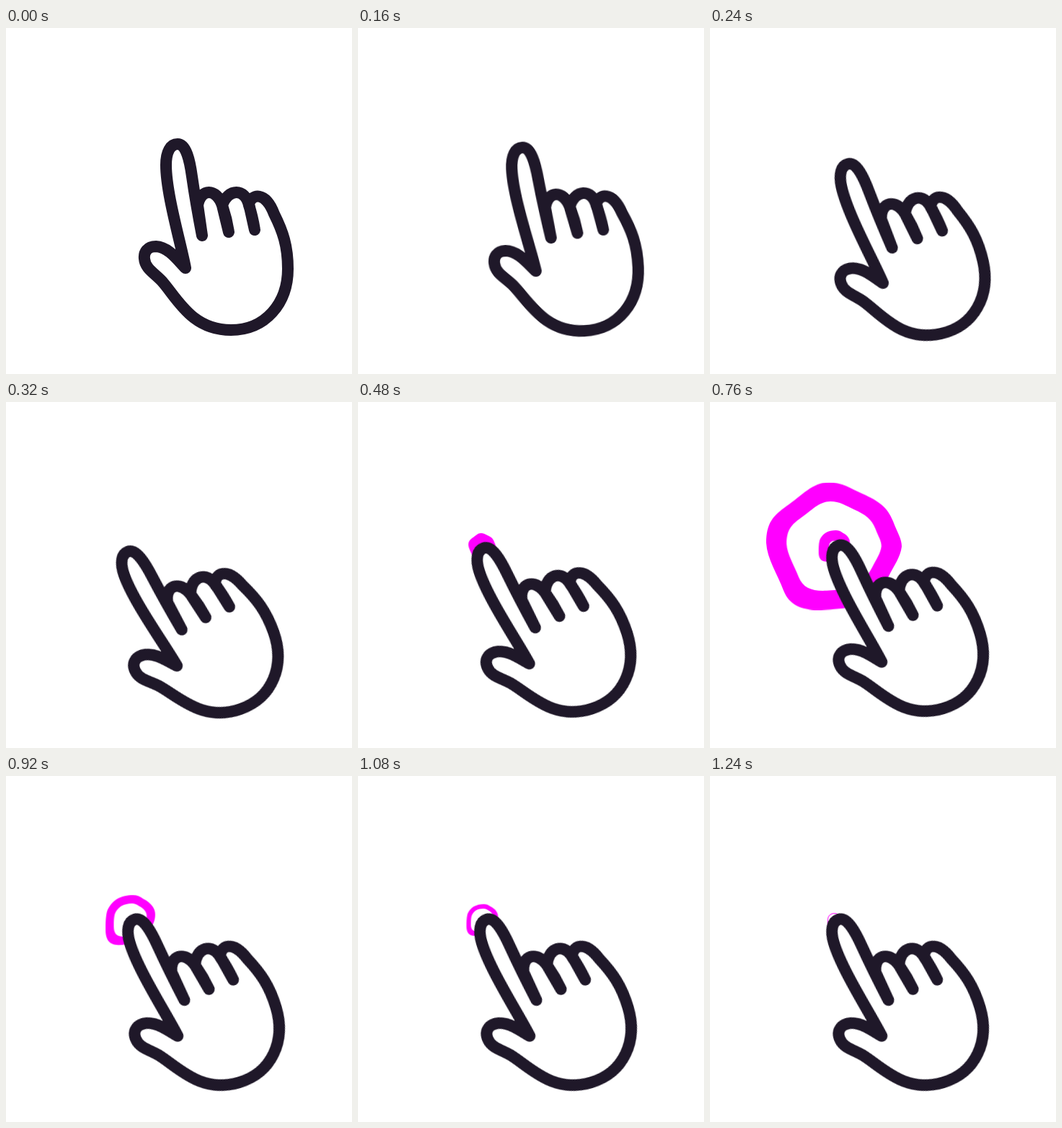
Recreate the animation shown at these times as an HTML page. Size 480 by 480 pixels, loop 1280 ms.

```html
<!DOCTYPE html>
<html lang="en">
<head>
<meta charset="utf-8">
<title>Tap gesture</title>
<style>
  html, body { margin: 0; height: 100%; overflow: hidden; background: #fff; }
  svg { display: block; width: 100vw; height: 100vh; }

  :root {
    --t: 0;
    --hex: path("M-7,-88 C12,-88 22,-80 40,-72 C62,-62 74,-54 82,-34 C88,-18 94,-10 94,1 C92,16 84,26 76,42 C66,62 50,78 18,86 C4,88 -14,89 -22,89 C-46,89 -62,82 -70,62 C-78,40 -93,18 -94,-4 C-94,-32 -84,-42 -66,-55 C-44,-70 -30,-88 -7,-88 Z");
    --drop: path("M11,-92 C26,-92 38,-87 50,-78 C66,-70 78,-60 84,-50 C91,-40 94,-30 94,-20 C94,0 88,16 76,30 C62,50 42,70 18,80 C-4,90 -24,94 -43,94 C-80,94 -91,70 -91,38 C-91,20 -91,-10 -86,-30 C-80,-50 -64,-68 -48,-78 C-32,-87 -10,-92 11,-92 Z");
  }

  /* Every animation is driven by the clock in --t (ms). */
  .hand, .blob {
    animation: 1280ms linear calc(var(--t) * -1ms) infinite paused;
  }
  .hand {
    fill: #fff;
    stroke: #1f1829;
    stroke-width: 16;
    stroke-linecap: round;
    stroke-linejoin: round;
    transform-origin: 339px 384px;
    animation-name: press;
  }
  .blob { transform-origin: 0 0; d: var(--drop); }
  .ink { fill: #f0f; }
  .gap { fill: #fff; }
  .burst { d: var(--hex); animation-name: burst; }
  .burst-gap { animation-name: burst-gap, open; }
  .echo { animation-name: echo; }
  .echo-gap { animation-name: echo-gap; }

  @keyframes press {
    0%, 9.375% { transform: rotate(0deg); }
    12.5% { transform: rotate(-2.6deg); animation-timing-function: cubic-bezier(.35, .35, .65, .9); }
    25% { transform: rotate(-19.5deg); animation-timing-function: ease-out; }
    29.69% { transform: rotate(-21deg); animation-timing-function: ease-in-out; }
    42.19%, 100% { transform: rotate(-16.5deg); }
  }
  @keyframes burst {
    0%, 34.375% { transform: scale(0); }
    40.625% { transform: scale(.4); }
    46.875% { transform: scale(.84); }
    53.125% { transform: scale(1.1); }
    56.25% { transform: scale(1.07); }
    59.375% { transform: scale(1); }
    65.6% { transform: scale(.94); }
    65.62%, 100% { transform: scale(0); }
  }
  @keyframes burst-gap {
    0%, 43% { transform: scale(0); }
    46.875% { transform: scale(.23); }
    53.125% { transform: scale(.48); }
    59.375% { transform: scale(.7); }
    65.6% { transform: scale(.94); }
    65.62%, 100% { transform: scale(0); }
  }
  @keyframes open {
    0%, 46.875% { d: var(--drop); }
    56.25%, 100% { d: var(--hex); }
  }
  @keyframes echo {
    0%, 53.125% { transform: scale(0); }
    59.375% { transform: scale(.234); }
    65.625% { transform: scale(.345); }
    71.875% { transform: scale(.372); animation-timing-function: ease-in-out; }
    96.875%, 100% { transform: scale(.101); }
  }
  @keyframes echo-gap {
    0%, 56.25% { transform: scale(0); }
    59.375% { transform: scale(.075); }
    65.625% { transform: scale(.19); }
    71.875% { transform: scale(.247); animation-timing-function: ease-in-out; }
    96.875%, 100% { transform: scale(.091); }
  }
</style>
</head>
<body>
<svg viewBox="0 0 480 480">
  <g transform="translate(172 199.5)">
    <path class="blob ink burst"/>
    <path class="blob gap burst-gap"/>
    <path class="blob ink echo"/>
    <path class="blob gap echo-gap"/>
  </g>
  <path class="hand" d="
    M249,333 C243,300 222,230 222,190 C222,172 228,161 238,161
    C250,161 255,184 258,206 C262,234 267,262 272,288 L266,246
    C270,222 292,222 300,246 C304,258 307,270 309,283 L300,246
    C308,222 332,222 337,246 C341,258 343,268 345,280 L337,244
    C341,230 360,226 372,258 C384,282 391,302 391,334
    C391,382 360,419 312,419 C258,419 238,376 217,352
    C206,340 193,334 192,320 C191,311 196,303 208,303
    C226,304 238,322 249,333 Z"/>
</svg>
<script>
  const LOOP = 1280, STEP = 40;
  const start = performance.now();

  function draw() {
    const time = Math.max(0, performance.now() - start) % LOOP;
    const tick = Math.floor(time / STEP) * STEP;
    document.documentElement.style.setProperty('--t', tick);
    requestAnimationFrame(draw);
  }
  draw();
</script>
</body>
</html>
```
